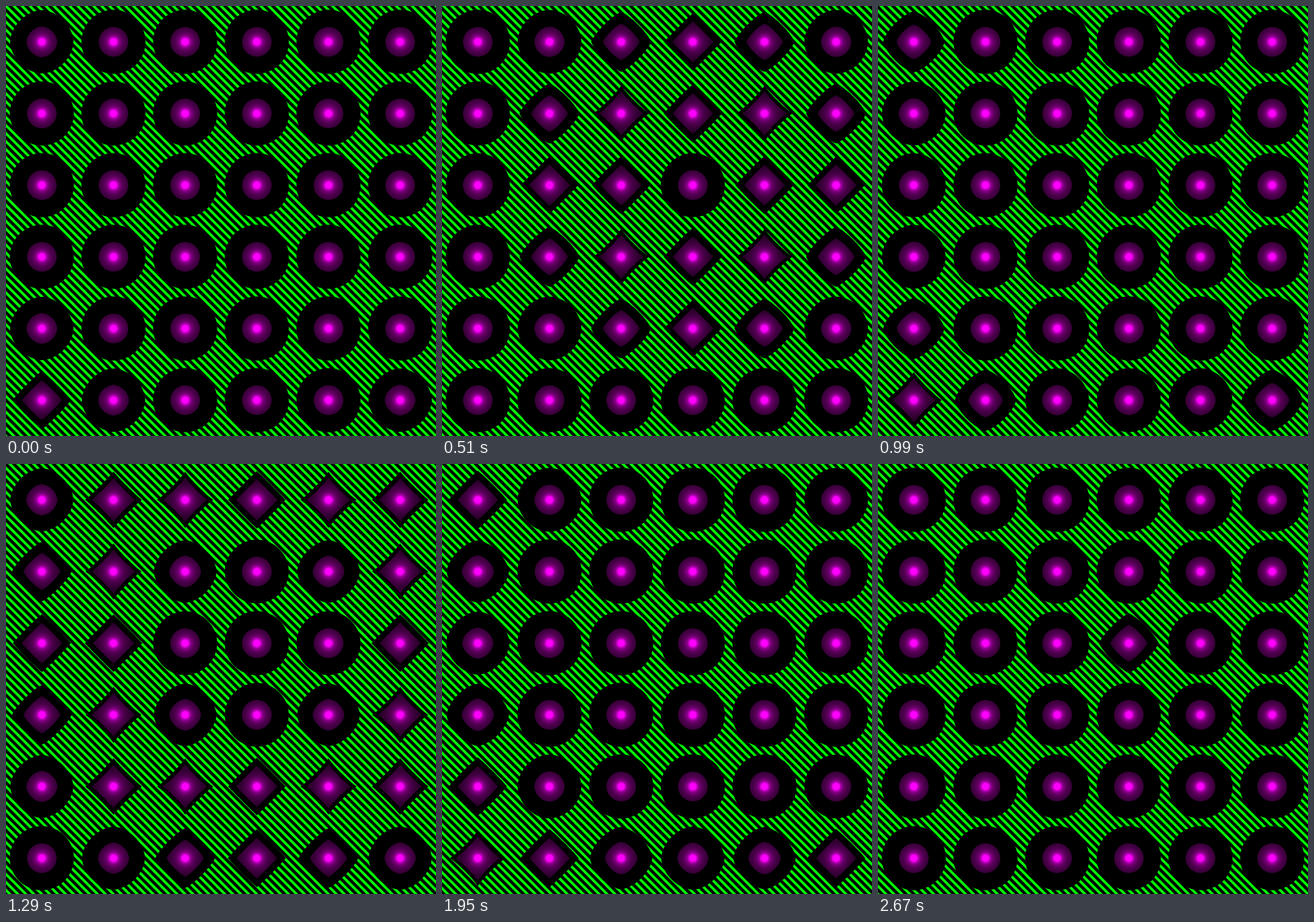
Write an HTML page with a canvas that moves like this. It is 510 px wide and 510 px high and loops after 2.7 s.

```html
<!DOCTYPE html>
<html lang="en">
<head>
<meta charset="utf-8">
<title>Morphing dots</title>
<style>
  html, body { margin: 0; width: 100%; height: 100%; overflow: hidden; background: #000; }
  canvas { display: block; width: 510px; height: 510px; }
</style>
</head>
<body>
<canvas id="stage" width="510" height="510"></canvas>
<script>
const SIZE = 510, COUNT = 6, CELL = SIZE / COUNT, HALF = CELL / 2;
const STRIPE = CELL / 9, LOOP = 2700, PERIOD = 900, STEP = 30;
const FOCUS = { col: 3, row: 2 };
const ctx = document.getElementById('stage').getContext('2d');

// Brightness falls off as 1 / r around a solid core.
const glow = ctx.createRadialGradient(0, 0, 0, 0, 0, 40);
for (let r = 0; r <= 40; r++) {
  const v = Math.round(255 * Math.min(1, 3.8 / (r || 1)));
  glow.addColorStop(r / 40, `rgb(${v},0,${v})`);
}

// Superellipse |x|^p + |y|^p = radius^p around the current origin.
function blob(radius, p, fill) {
  const bend = v => Math.sign(v) * Math.abs(v) ** (2 / p);
  ctx.beginPath();
  for (let i = 0; i < 96; i++) {
    const a = i / 96 * Math.PI * 2;
    ctx.lineTo(radius * bend(Math.cos(a)), radius * bend(Math.sin(a)));
  }
  ctx.closePath();
  ctx.fillStyle = fill;
  ctx.fill();
}

function stripes(shift) {
  ctx.strokeStyle = '#0f0';
  ctx.lineWidth = STRIPE * 0.45 * Math.SQRT1_2;
  ctx.beginPath();
  for (let x = -SIZE - STRIPE; x < SIZE + STRIPE; x += STRIPE) {
    ctx.moveTo(x + shift - 10, -10);
    ctx.lineTo(x + shift + SIZE + 10, SIZE + 10);
  }
  ctx.stroke();
}

function draw(time) {
  ctx.fillStyle = '#000';
  ctx.fillRect(0, 0, SIZE, SIZE);
  stripes(STRIPE * (time % LOOP) / LOOP);

  // A ring of diamonds closes in on the focus cell.
  const phase = time % PERIOD / PERIOD;
  const ring = 2 + 1.4 * (Math.cos(Math.PI * phase) + 1 - 2 * phase);
  for (let row = 0; row < COUNT; row++) {
    for (let col = 0; col < COUNT; col++) {
      const dist = Math.hypot(col - FOCUS.col, row - FOCUS.row);
      const p = 2 - 1.1 * Math.exp(-(Math.abs(dist - ring) ** 3));
      ctx.save();
      ctx.translate(col * CELL + HALF, row * CELL + HALF);
      blob(HALF * 0.8 ** (1 / p), p, '#000');
      blob(17.5 * 2 ** (1 / p - 0.5), p, glow);
      ctx.restore();
    }
  }
}

const start = performance.now();
function tick() {
  draw(Math.floor((performance.now() - start) / STEP) * STEP);
  requestAnimationFrame(tick);
}
tick();
</script>
</body>
</html>
```
